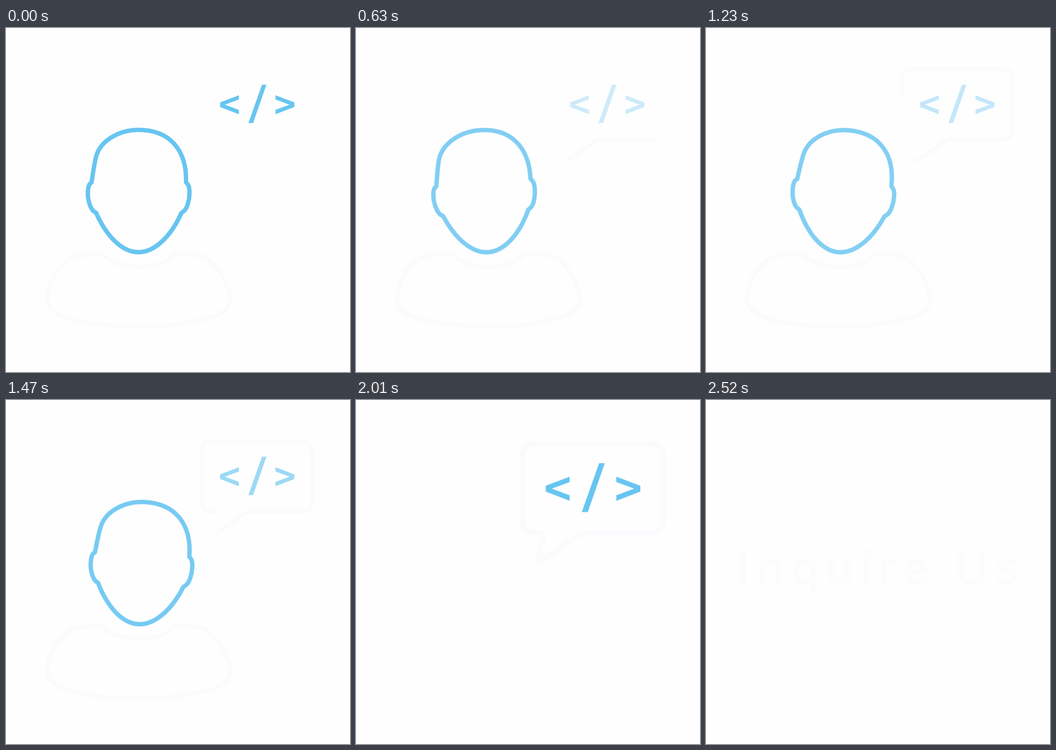
An HTML page for the animation above (3.15 s loop, 748 by 748 pixels).

```html
<!DOCTYPE html>
<html lang="en">
<head>
<meta charset="utf-8">
<title>Inquire Us</title>
<style>
  html, body { margin: 0; width: 100%; height: 100%; overflow: hidden; background: #fefefe; }
  svg { display: block; width: 100%; height: 100%; }
  .line { fill: none; stroke: #fafbfd; stroke-width: 9.5; stroke-linejoin: round; }
  #head { stroke: #67c5f1; transform-origin: 288px 487px; }
  #talk { transform-origin: 659px 71.5px; }
  #bubble { stroke-dasharray: 1 2; stroke-dashoffset: 1; }
  #code { fill: #67c5f1; }
  #label { opacity: 0; fill: #fcfcfc; font: 600 100px Inter, "Open Sans", sans-serif; letter-spacing: 14px; }
</style>
</head>
<body>
<svg viewBox="0 0 748 748">
  <g id="person">
    <path class="line" d="M210 490L157 494.5C117 503 89 555 89 588C89 625 148 648 290 648.5C330 648.5 355 648 375 644L437 632C470 625 487 606 487 590C487 560 455 500 420 494.5L366 490C350 512 320 519.5 291 519.5C255 519.5 222 508 210 490Z"/>
    <path id="head" class="line" d="M288 221.5C248 221.5 208 243 197 276C192 292 189 318 186 336C180 339 178 346 178 360C178 378 185 393 190 398L196 402C219 454 253 487.5 288 487.5C322 487.5 358 455 381.5 402L387 398C394 392 399 374 399 359C399 345 397 341 391.5 335.5C393.5 265 356 221.5 288 221.5Z"/>
  </g>
  <g id="talk">
    <path id="bubble" class="line" pathLength="1" d="M456 291L521 245.5Q525 242.7 529 242.7H646A20 20 0 0 0 666 222.7V109.5A20 20 0 0 0 646 89.5H446A20 20 0 0 0 426 109.5V222.7A20 20 0 0 0 446 242.7H457Q462 242.7 461 248L451.5 289Q451 294.5 456 291"/>
    <path id="code" d="M465.5 161.8L506.3 146.3V155.4L476 166.7L506.3 178V187.4L465.5 171.8ZM556.6 123.2H566.3L537.3 206.8H527.1ZM586 146.3L627 161.8V171.8L586 187.4V178L616.5 166.7L586 155.4Z"/>
  </g>
  <text id="label" x="381" y="400" text-anchor="middle">Inquire Us</text>
</svg>
<script>
  const LOOP = 3150, ZOOM = 1800, CUT = 2520;
  const BLUE = [103, 197, 241], PALE = [250, 251, 253];

  const tint = p => `rgb(${PALE.map((c, i) => Math.round(c + (BLUE[i] - c) * p))})`;

  // steps: [time, value, easing]; the last value holds until the loop ends
  function play(id, prop, steps, map = v => v) {
    const frames = steps.map(([ms, v, easing = 'linear']) =>
      ({ offset: ms / LOOP, [prop]: map(v), easing }));
    frames.push({ ...frames[frames.length - 1], offset: 1 });
    document.getElementById(id).animate(frames, { duration: LOOP, iterations: Infinity });
  }

  const cut = (id, ms, from, to) => play(id, 'opacity', [[0, from], [ms, from], [ms, to]]);

  play('head', 'transform',
    [[0, 0], [600, -5], [960, 1.7], [1170, 5], [1470, 2.75], [ZOOM, 0]], a => `rotate(${a}deg)`);
  play('head', 'stroke',
    [[0, 1], [330, .96], [600, .92], [900, 0], [960, .13], [1200, .8], [1470, .9], [ZOOM, 1]], tint);
  play('code', 'fill', [[0, 1], [900, 0], [ZOOM, 1]], tint);
  play('bubble', 'strokeDashoffset', [[0, 1, 'ease-in-out'], [ZOOM, 0]]);
  play('talk', 'transform', [[0, 1], [ZOOM, 1, 'ease-in-out'], [CUT, 2.53]], s => `scale(${s})`);
  cut('person', ZOOM, 1, 0);
  cut('talk', CUT, 1, 0);
  cut('label', CUT, 0, 1);
</script>
</body>
</html>
```
